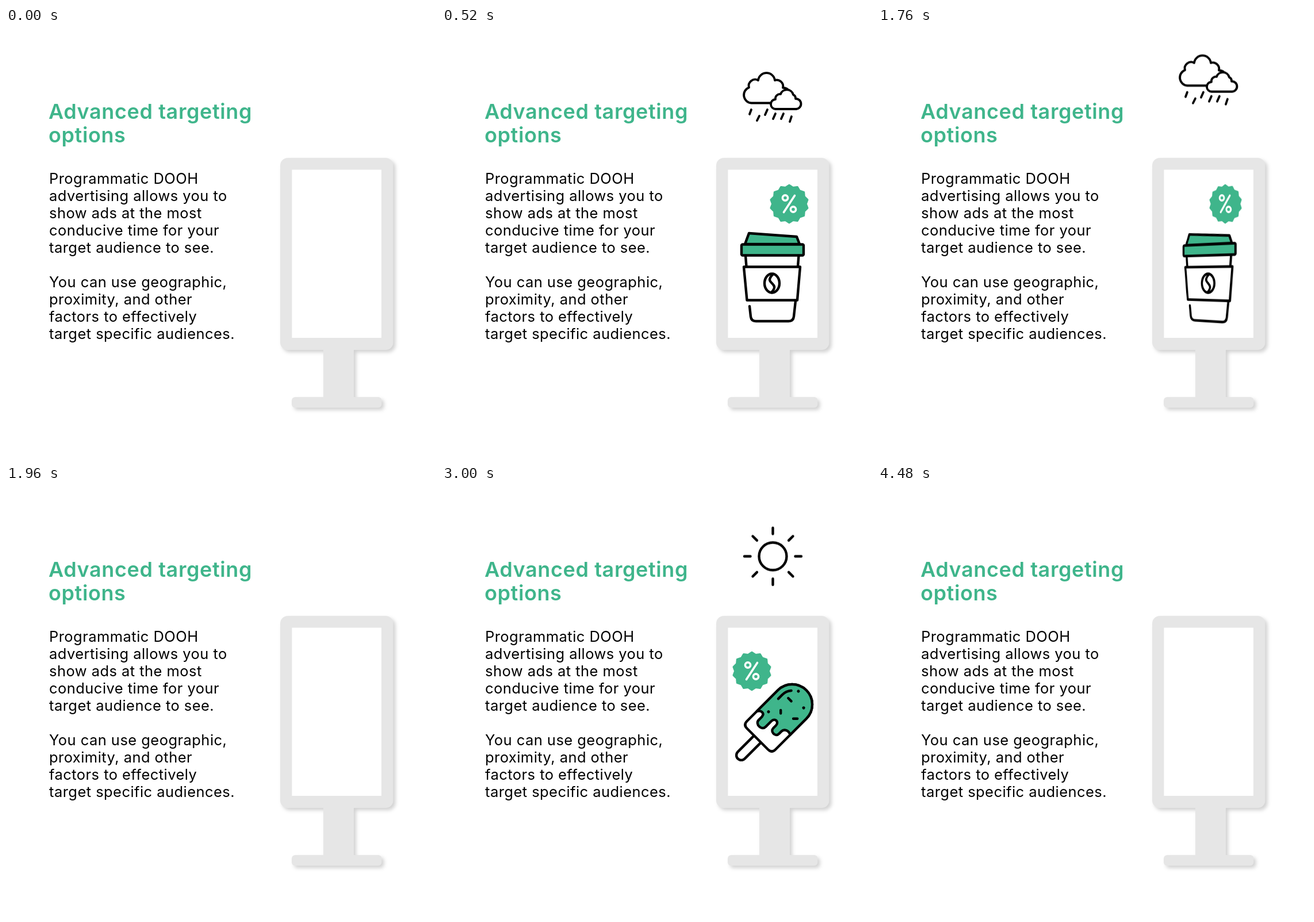
Animation, 748 px wide and 748 px high, one loop 5 s. Source, as an HTML page:

```html
<!DOCTYPE html>
<html lang="en">
<head>
<meta charset="utf-8">
<title>Advanced targeting options</title>
<style>
  html, body { margin: 0; width: 100%; height: 100%; overflow: hidden; background: #fff; }
  #stage { position: relative; width: 748px; height: 748px; overflow: hidden; }
  svg { position: absolute; left: 0; top: 0; width: 748px; height: 748px; }
  text { font-family: Inter, "Open Sans", sans-serif; white-space: pre; }
  .title { font-size: 36px; font-weight: 600; letter-spacing: .6px; fill: #3fb58b; }
  .body { font-size: 25.5px; letter-spacing: .45px; fill: #000; }
  .kiosk { fill: #e6e6e6; filter: drop-shadow(4px 4px 3px rgba(0, 0, 0, .18)); }
  .move { visibility: hidden; backface-visibility: hidden; }
  .line { fill: none; stroke: #000; stroke-width: 4.4; stroke-linecap: round; stroke-linejoin: round; }
  .thin { stroke-width: 3.8; }
  .green { fill: #3fb58b; }
  .white { fill: #fff; }
  .dot { fill: #000; stroke: none; }
</style>
</head>
<body>
<div id="stage">
  <svg viewBox="0 0 748 748">
    <g id="copy"></g>
    <g class="kiosk">
      <rect x="477" y="226" width="196.5" height="334" rx="13"/>
      <rect x="552" y="555" width="53" height="90"/>
      <rect x="497" y="642" width="156.5" height="18.5" rx="6"/>
    </g>
    <rect x="497.5" y="246.500" width="155.5" height="292.5" fill="#fff"/>
  </svg>

  <svg class="move" id="cloud" viewBox="0 0 748 748">
    <g class="line thin">
      <path d="M573 130.5H538A14 14 0 0 1 534 103.5A11 11 0 0 1 550 91A14.6 14.6 0 0 1 579 91A11 11 0 0 1 593 104Q601 104 605 111"/>
      <path class="white" d="M581 141A8.5 8.5 0 0 1 580 124A8 8 0 0 1 589 115A11.5 11.5 0 0 1 611 116A7 7 0 0 1 615 123A9 9 0 0 1 616 141Z"/>
      <path d="M538 142L535 150M552 153L548 161M566 142L562 151M580 149L576 158M594 149L590 158M608 154L605 163"/>
    </g>
  </svg>

  <svg class="move" id="cup" viewBox="0 0 748 748">
    <g class="line">
      <path class="green" d="M527 376L534 357L617 363L622 376Z"/>
      <rect class="green" x="521" y="376.5" width="108" height="19" rx="2"/>
      <path d="M528 396L529.5 415M620.5 396L619 415"/>
      <path class="white" d="M525 415.5H623L618 473.5H530.5Z"/>
      <path d="M535 484L537 502Q538 510 546 510H603Q611 510 612 502L615 475"/>
      <ellipse cx="574" cy="444" rx="13" ry="16.5"/>
      <path d="M576 428C566 438 571 441 574 444S582 451 573 460"/>
    </g>
  </svg>

  <svg class="move" id="sun" viewBox="0 0 748 748">
    <g class="line" id="rays" transform="translate(575.5 122.5)"><circle r="24"/></g>
  </svg>

  <svg class="move" id="lolly" viewBox="0 0 748 748">
    <g class="line" transform="translate(609 380) rotate(45)">
      <path class="white" d="M-8.5 85V125A8.5 8.5 0 0 0 8.5 125V85"/>
      <path class="white" d="M-35 0A35 35 0 0 1 35 0V76Q35 85 26 85H-26Q-35 85 -35 76Z"/>
      <path class="green" d="M-35 52C-32 45 -23 44 -22 52V60C-22 70 -5 70 -5 60V46C-5 37 6 37 6 46V52C6 61 20 61 20 52V46C20 39 29 36 35 40V0A35 35 0 0 0 -35 0Z"/>
      <path d="M-24 10V0A24 24 0 0 1 -18 -16M-12.5 -3H-5M-7 21L-3 25M19 16L24 11"/>
      <circle class="dot" cx="-8.5" cy="-24" r="2.6"/>
      <circle class="dot" cx="18.4" cy="-10" r="2.6"/>
      <circle class="dot" cx="-20" cy="38" r="2.6"/>
    </g>
  </svg>

  <svg class="move" id="badgeA" viewBox="0 0 748 748"></svg>
  <svg class="move" id="badgeB" viewBox="0 0 748 748"></svg>
</div>
<script>
const $ = id => document.getElementById(id);
const LOOP = 5000, STEP = 40;

function addLines(cls, x, y, gap, lines) {
  $('copy').innerHTML += lines.map((s, i) =>
    `<text class="${cls}" x="${x}" y="${y + i * gap}">${s}</text>`).join('');
}
addLines('title', 74, 157.5, 41.5, ['Advanced targeting', 'options']);
addLines('body', 75, 271, 30, [
  'Programmatic DOOH', 'advertising allows you to', 'show ads at the most',
  'conducive time for your', 'target audience to see.', '',
  'You can use geographic,', 'proximity, and other', 'factors to effectively',
  'target specific audiences.'
]);

function polar(r, a) {
  return `${(r * Math.sin(a)).toFixed(2)} ${(-r * Math.cos(a)).toFixed(2)}`;
}

let rays = '';
for (let i = 0; i < 8; i++) rays += `M${polar(39, i * Math.PI / 4)}L${polar(49.5, i * Math.PI / 4)}`;
$('rays').innerHTML += `<path d="${rays}"/>`;

function badge(id, x, y) {
  const teeth = 14, pts = [];
  for (let i = 0; i < teeth * 2; i++) pts.push(polar(i % 2 ? 29 : 32.5, i * Math.PI / teeth));
  $(id).innerHTML = `<g transform="translate(${x} ${y})" fill="none" stroke="#fff"
    stroke-width="3.6" stroke-linecap="round">
    <path class="green" d="M${pts.join('L')}Z" stroke="#3fb58b" stroke-linejoin="round"/>
    <path d="M9.5 -14.5L-9.5 14.5"/>
    <circle cx="-7" cy="-10.5" r="4.6"/><circle cx="7" cy="9.5" r="4.6"/></g>`;
}
badge('badgeA', 604, 306);
badge('badgeB', 539, 322);

// Each scene: entry start, entry end, exit start, exit end.
const rainy = [0, 540, 1500, 1960], sunny = [2520, 3060, 3980, 4480];
const slides = [['cloud', rainy], ['sun', sunny]];
const flips = [['cup', rainy, 575, 434], ['badgeA', rainy, 604, 306],
               ['lolly', sunny, 577.5, 412], ['badgeB', sunny, 539, 322]];
for (const [id, , x, y] of flips) $(id).style.transformOrigin = `${x}px ${y}px`;

const clamp = v => Math.min(1, Math.max(0, v));

// 1 = away, 0 = at rest
function away(t, [a, b, c, d]) {
  return t < c ? (1 - clamp((t - a) / (b - a))) ** 3 : clamp((t - c) / (d - c)) ** 3;
}

function place(id, k, transform) {
  const s = $(id).style;
  s.visibility = k < 1 ? 'visible' : 'hidden';
  s.transform = k > 0 ? transform : 'none';
}

function draw(now) {
  const t = Math.floor(now % LOOP / STEP) * STEP;
  for (const [id, scene] of slides) {
    const k = away(t, scene);
    place(id, k, `translateY(${-168 * k}px)`);
  }
  for (const [id, scene] of flips) {
    const k = away(t, scene);
    place(id, k, `perspective(800px) rotateY(${-184 * k}deg)`);
  }
}

const start = performance.now();
function tick() {
  draw(performance.now() - start);
  requestAnimationFrame(tick);
}
tick();
</script>
</body>
</html>
```
